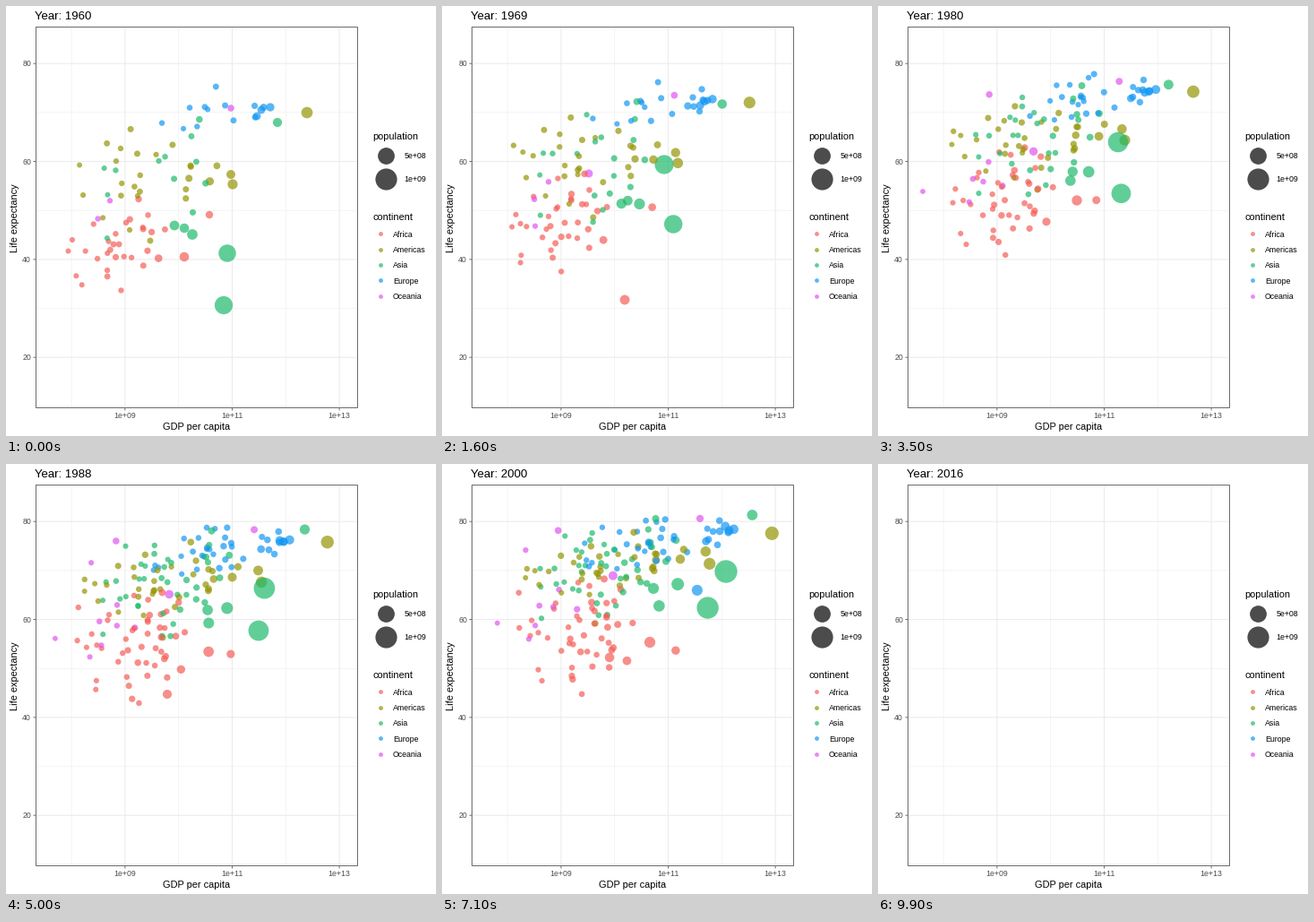
Animation of 480 by 480 pixels, one loop 10000 ms. Source, as a matplotlib script:

```python
import numpy as np
import matplotlib.pyplot as plt
from matplotlib.animation import FuncAnimation

plt.rcParams["font.family"] = "Liberation Sans"

SIZE, DPI = 480, 100
PX = 72 / DPI
FRAMES, STEP = 100, 100
FIRST, LAST, DATA_END = 1960, 2016, 2011
LEFT, RIGHT, TOP, BOTTOM = 33.5, 392.5, 23.5, 448.5
ALPHA = 0.7
EDGE = "#6c6c6c"
rng = np.random.default_rng(12)


class Group:
    """A continent: its colour and how its cloud of dots lies and drifts.

    start and end hold the mean and spread of x, the mean and spread of y,
    and the slope of y against x; bend > 1 makes life expectancy rise early.
    """

    def __init__(self, color, count, early, start, end, bend):
        self.color, self.count, self.early = color, count, early
        self.start, self.end, self.bend = start, end, bend


GROUPS = {
    "Africa": Group("#f55f58", 46, 29, (133, 33, 264, 27, -0.3),
                    (172, 36, 185, 36, -0.2), 2),
    "Americas": Group("#959505", 34, 24, (160, 40, 185, 34, 0),
                      (196, 46, 101, 14, -0.15), 1.4),
    "Asia": Group("#1eba6c", 40, 12, (180, 36, 198, 38, 0),
                  (200, 48, 107, 26, -0.15), 1.5),
    "Europe": Group("#1297f3", 36, 12, (231, 32, 115, 13, -0.05),
                    (245, 45, 80, 15, -0.2), 1),
    "Oceania": Group("#e154f0", 9, 2, (115, 25, 215, 45, -0.4),
                     (130, 44, 128, 32, -0.3), 1.4),
}

# group, population in millions, place in 1960, place in 2011
GIANTS = [
    ("Americas", 195, (253, 199), (311, 100)),
    ("Asia", 1200, (247, 276), (310, 148)),
    ("Asia", 150, (199, 248), (246, 127)),
    ("Asia", 235, (208, 255), (278, 121)),
    ("Asia", 128, (303, 130), (358, 49)),
    ("Asia", 170, (188, 245), (257, 149)),
    ("Americas", 115, (251, 188), (306, 86)),
    ("Africa", 50, (227, 233), (270, 207)),
    ("Europe", 82, (295, 113), (334, 62)),
    ("Europe", 62, (285, 116), (330, 63)),
    ("Europe", 62, (280, 123), (326, 55)),
    ("Americas", 310, (336, 119), (377, 72)),
    ("Oceania", 22, (251, 114), (298, 54)),
]

# group, population, then year, x, y where the path turns
TURNS = [
    ("Asia", 1330, [(1960, 243, 334), (1969, 248, 177), (1980, 268, 152),
                    (2000, 317, 120), (2011, 344, 93)]),
    ("Africa", 150, [(1960, 199, 280), (1969, 204, 328), (1972, 214, 245),
                     (1980, 222, 217), (2000, 232, 199), (2011, 249, 173)]),
    ("Africa", 10, [(1960, 120, 266), (1990, 142, 262), (1994, 126, 429),
                    (1996, 138, 270), (2011, 167, 160)]),
    ("Americas", 9, [(1960, 161, 262), (1980, 178, 205), (2009, 168, 166),
                     (2010, 167, 326), (2011, 168, 164)]),
    ("Africa", 80, [(1981, 174, 264), (1984, 175, 306), (1988, 180, 257),
                    (2000, 187, 216), (2011, 213, 158)]),
    ("Europe", 143, [(1990, 284, 124), (1994, 279, 153), (2011, 295, 120)]),
    ("Oceania", 0.1, [(1970, 64, 228), (1980, 50, 207), (2011, 68, 162)]),
]


def to_frame(year):
    return np.round((np.asarray(year) - FIRST) * (FRAMES - 1) / (LAST - FIRST))


def lerp(a, b, u):
    return a + (b - a) * u


def drift(a, b, year, bend):
    """GDP moves steadily, life expectancy gains slow down."""
    u = min(1, (year - FIRST) / (DATA_END - FIRST))
    return lerp(a[0], b[0], u), lerp(a[1], b[1], 1 - (1 - u) ** bend)


def cloud_place(rule, wealth, health):
    x_mean, x_spread, y_mean, y_spread, slope = rule
    dx = x_spread * wealth
    return x_mean + dx, max(54, y_mean + slope * dx + y_spread * health)


class Dot:
    def __init__(self, group, pop, place, entry=FIRST):
        self.color, self.pop, self.place = group.color, pop, place
        self.entry = to_frame(entry)


def drifting(group, pop, a, b, entry=FIRST, sway=0.0):
    phase = rng.uniform(0, 2 * np.pi)

    def place(k):
        year = FIRST + k * (LAST - FIRST) / (FRAMES - 1)
        x, y = drift(a, b, year, group.bend)
        wave = sway * np.sin(0.35 * (year - FIRST) + phase)
        return x + wave, y + 0.4 * wave

    return Dot(group, pop, place, entry)


def turning(group, pop, keys):
    years, xs, ys = zip(*keys)
    at = to_frame(years)
    return Dot(group, pop, lambda k: (np.interp(k, at, xs), np.interp(k, at, ys)),
               years[0])


def cloud_dots(group):
    late = group.count - group.early
    for i in range(group.count):
        wealth, health = np.clip(rng.normal(size=2), -1.9, 1.9)
        entry = FIRST
        if i >= group.early:
            entry = 1962 + 30 * (i - group.early) / late
            wealth -= 0.25
        pop = 5 * np.exp(0.9 * wealth + 0.6 * rng.normal())
        yield drifting(group, pop, cloud_place(group.start, wealth, health),
                       cloud_place(group.end, wealth, health), entry, 2)


giants = [drifting(GROUPS[g], pop, a, b) for g, pop, a, b in GIANTS]
giants[1:1] = [turning(GROUPS[g], pop, keys) for g, pop, keys in TURNS]
crowd = [d for g in GROUPS.values() for d in cloud_dots(g)]
dots = giants + [crowd[i] for i in rng.permutation(len(crowd))]

fig = plt.figure(figsize=(SIZE / DPI, SIZE / DPI), dpi=DPI, facecolor="white")
ax = fig.add_axes([0, 0, 1, 1])
ax.set_xlim(0, SIZE)
ax.set_ylim(SIZE, 0)
ax.axis("off")


def line(xs, ys, color, width, z):
    ax.plot(xs, ys, color=color, lw=width * PX, zorder=z, snap=False,
            solid_capstyle="butt", solid_joinstyle="miter")


def label(x, y, text, size, color="black", **kw):
    return ax.text(x, y, text, fontsize=size * PX, color=color, **kw)


def area(radius):
    return (2 * np.asarray(radius) * PX) ** 2


def radius_of(pop):
    return 2.84 + 10.67 * np.sqrt(np.asarray(pop) / 1330)


def draw_dots(xs, ys, radius, color):
    return ax.scatter(xs, ys, s=area(radius), c=color, alpha=ALPHA,
                      linewidths=0, zorder=3, snap=False)


# grid, ticks and border
for i in range(6):
    x = 73.1 + 59.8 * i
    line([x, x], [TOP, BOTTOM], "#ebebeb", 1.07 if i % 2 else 0.53, 1)
for i in range(8):
    y = 64.2 + 54.67 * i
    line([LEFT, RIGHT], [y, y], "#ebebeb", 0.53 if i % 2 else 1.07, 1)
for i in range(3):
    x = 132.9 + 119.6 * i
    line([x, x], [BOTTOM, BOTTOM + 3], EDGE, 1, 2)
    label(x - 0.4, 460, f"1e+{9 + 2 * i:02d}", 8.8, "#4d4d4d", ha="center")
for i in range(4):
    y = 64.2 + 109.33 * i
    line([LEFT - 3, LEFT], [y, y], EDGE, 1, 2)
    label(28, y + 3, str(80 - 20 * i), 8.8, "#4d4d4d", ha="right")
line([LEFT, RIGHT, RIGHT, LEFT, LEFT], [TOP, TOP, BOTTOM, BOTTOM, TOP], EDGE, 1, 4)

title = label(32.5, 15, "", 13.2)
label(212.7, 473, "GDP per capita", 11, ha="center")
label(15.2, 236.5, "Life expectancy", 11, rotation=90, ha="right", va="center")

# legends
label(409, 149, "population", 11)
for y, pop, text in ((166.5, 500, "5e+08"), (193, 1000, "1e+09")):
    draw_dots([424], [y], radius_of(pop), "black")
    label(444.3, y + 3.3, text, 8.8)
label(409, 239, "continent", 11)
for i, (name, group) in enumerate(GROUPS.items()):
    y = 254.3 + 17.3 * i
    draw_dots([417.7], [y], 2.4, group.color)
    label(432, y + 3.5, name, 8.8)

pops = np.array([d.pop for d in dots])
entries = np.array([d.entry for d in dots])
cloud = draw_dots(np.zeros(len(dots)), np.zeros(len(dots)), radius_of(pops),
                  [d.color for d in dots])


def update(k):
    year = FIRST + k * (LAST - FIRST) / (FRAMES - 1)
    title.set_text(f"Year: {round(year)}")
    cloud.set_offsets([d.place(k) for d in dots])
    shown = (k >= entries) & (k <= to_frame(DATA_END))
    radius = radius_of(pops * np.exp(0.015 * (year - DATA_END)))
    cloud.set_sizes(area(np.where(shown, radius, 0)))
    return cloud, title


anim = FuncAnimation(fig, update, frames=FRAMES, interval=STEP, repeat=True,
                     repeat_delay=0, blit=False)
plt.show()
```
